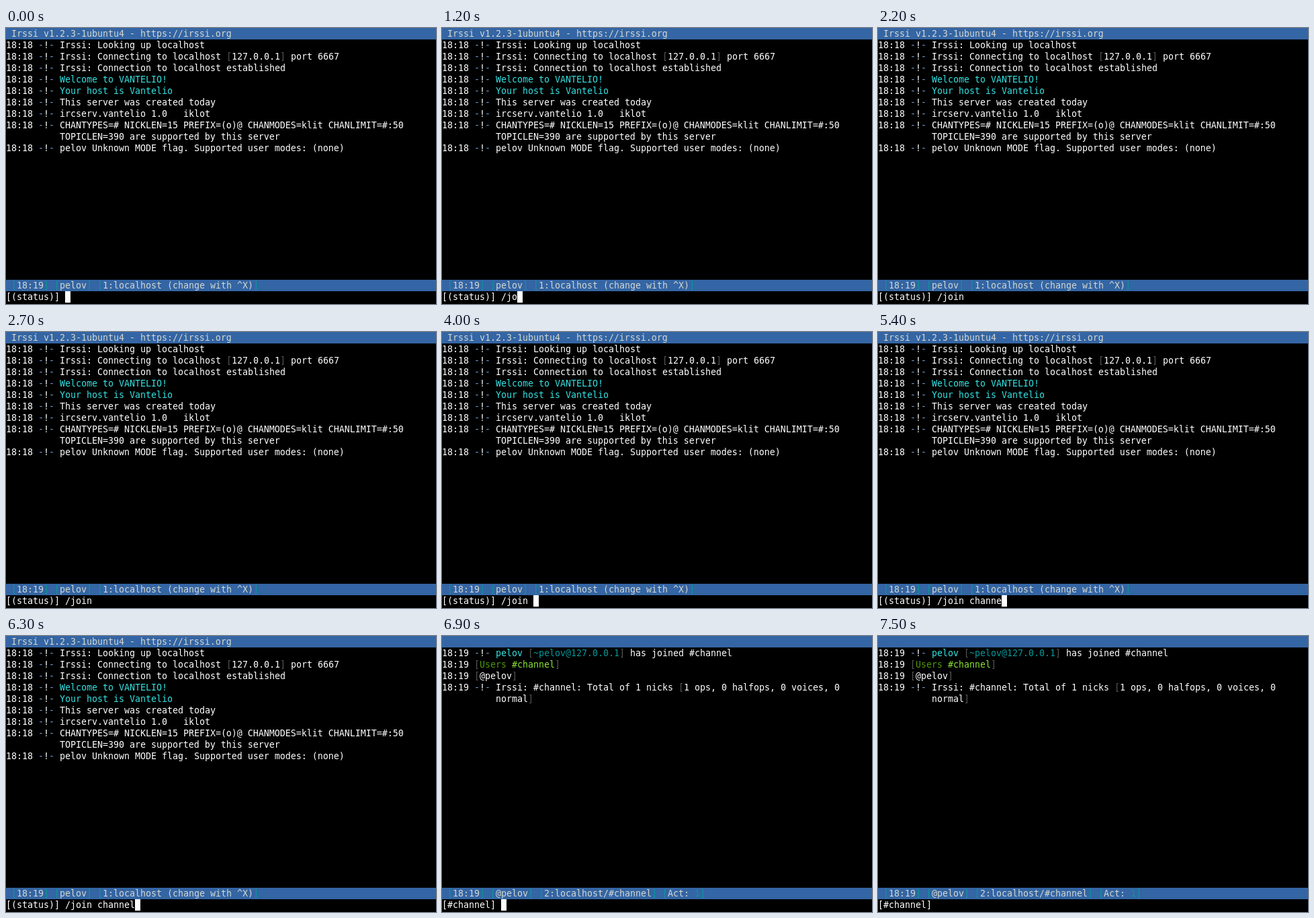
Animation of 640 by 410 pixels, one loop 8 s. Source, as an HTML page:

```html
<!DOCTYPE html>
<html lang="en">
<head>
<meta charset="utf-8">
<title>Terminal chat</title>
<style>
html, body { margin: 0; width: 100%; height: 100%; overflow: hidden; background: #000; }
svg { display: block; width: 640px; height: 410px; }
text { font: 13.29px "DejaVu Sans Mono", monospace; white-space: pre; }
</style>
</head>
<body>
<svg id="stage" viewBox="0 0 640 410" xmlns="http://www.w3.org/2000/svg"></svg>
<script>
const CELL = 8, ROW = 17, BASE = 13, LOOP = 8000, BLINK = 600, ENTER = 6900;
const PROMPT_ROW = 23, INPUT_COL = 11;
const BAR = '#3465a4';
const stage = document.getElementById('stage');

// Markup: {key|text}; an upper-case key means bold
const COLORS = {
  w: '#fff', s: '#d3d7cf', k: '#555753', b: '#729fcf',
  c: '#06989a', y: '#34e2e2', g: '#4e9a06', l: '#8ae234'
};

function add(parent, tag, attrs) {
  const el = document.createElementNS('http://www.w3.org/2000/svg', tag);
  for (const name in attrs) el.setAttribute(name, attrs[name]);
  return parent.appendChild(el);
}

function write(parent, row, markup, base = 'w') {
  let col = 0;
  for (const [, key, marked, plain] of markup.matchAll(/\{(\w)\|([^}]*)\}|([^{]+)/g)) {
    const style = key || base, run = marked ?? plain;
    const el = add(parent, 'text', {
      x: col * CELL, y: row * ROW + BASE,
      fill: COLORS[style.toLowerCase()],
      'font-weight': style < 'a' ? 700 : 400
    });
    el.textContent = run;
    col += run.length;
  }
}

const bar = (parent, row) =>
  add(parent, 'rect', { x: 0, y: row * ROW, width: 640, height: ROW, fill: BAR });
const note = (time, body) => `${time} {b|-}!{b|-} ${body}`;
const box = (body, key = 'k') => `{${key}|[}${body}{${key}|]}`;

function makeScreen(title, lines, status, prompt) {
  const g = add(stage, 'g', {});
  bar(g, 0);
  bar(g, 22);
  write(g, 0, title, 's');
  lines.forEach((line, i) => write(g, i + 1, line));
  write(g, 22, status.map(item => ' ' + box(item, 'c')).join(''), 's');
  write(g, PROMPT_ROW, prompt);
  return g;
}

add(stage, 'rect', { width: 640, height: 410, fill: '#000' });

const statusScreen = makeScreen(' Irssi v1.2.3-1ubuntu4 - https://irssi.org', [
  ...[
    '{W|Irssi:} Looking up {W|localhost}',
    '{W|Irssi:} Connecting to {W|localhost} ' + box('127.0.0.1') + ' port {W|6667}',
    '{W|Irssi:} Connection to {W|localhost} established',
    '{Y|Welcome to VANTELIO!}',
    '{y|Your host is Vantelio}',
    'This server was created today',
    'ircserv.vantelio 1.0   iklot',
    'CHANTYPES=# NICKLEN=15 PREFIX=(o)@ CHANMODES=klit CHANLIMIT=#:50'
  ].map(body => note('18:18', body)),
  '          TOPICLEN=390 are supported by this server',
  note('18:18', 'pelov Unknown MODE flag. Supported user modes: (none)')
], ['18:19', 'pelov', '1:localhost (change with ^X)'], '[(status)]');

const channelScreen = makeScreen('', [
  note('18:19', '{y|pelov} ' + box('{c|~pelov@127.0.0.1}') + ' has joined {W|#channel}'),
  '18:19 ' + box('{g|Users} {l|#channel}'),
  '18:19 ' + box('{W|@}pelov'),
  note('18:19', '{W|Irssi:} {W|#channel}: Total of {W|1} nicks {k|[}{W|1} ops, {W|0} halfops, {W|0} voices, {W|0}'),
  '          normal{k|]}'
], ['18:19', '@pelov', '2:localhost/#channel', 'Act: {c|1}'], '[#channel]');

const input = add(stage, 'text', {
  x: INPUT_COL * CELL, y: PROMPT_ROW * ROW + BASE, fill: COLORS.w
});
const cursor = add(stage, 'rect', {
  y: PROMPT_ROW * ROW, width: CELL, height: ROW, fill: COLORS.w
});

// Each key press: time and the length of the command after it
const COMMAND = '/join channel';
const KEYS = [
  [0, 0], [600, 1], [900, 2], [1200, 3], [1300, 4], [1400, 5], [1600, 6],
  [4700, 7], [4900, 8], [5000, 9], [5100, 10], [5200, 11], [5300, 12], [5500, 13],
  [6000, 12], [6100, 11], [6200, 12], [6300, 13], [ENTER, 0]
];

function draw(t) {
  const [pressed, length] = KEYS.findLast(key => key[0] <= t);
  const joined = t >= ENTER;
  statusScreen.style.display = joined ? 'none' : '';
  channelScreen.style.display = joined ? '' : 'none';
  input.textContent = COMMAND.slice(0, length);
  cursor.setAttribute('x', (INPUT_COL + length) * CELL);
  cursor.style.display = Math.floor((t - pressed) / BLINK) % 2 ? 'none' : '';
}

const start = performance.now();
function tick() {
  draw((performance.now() - start) % LOOP);
  requestAnimationFrame(tick);
}
draw(0);
requestAnimationFrame(tick);
</script>
</body>
</html>
```
